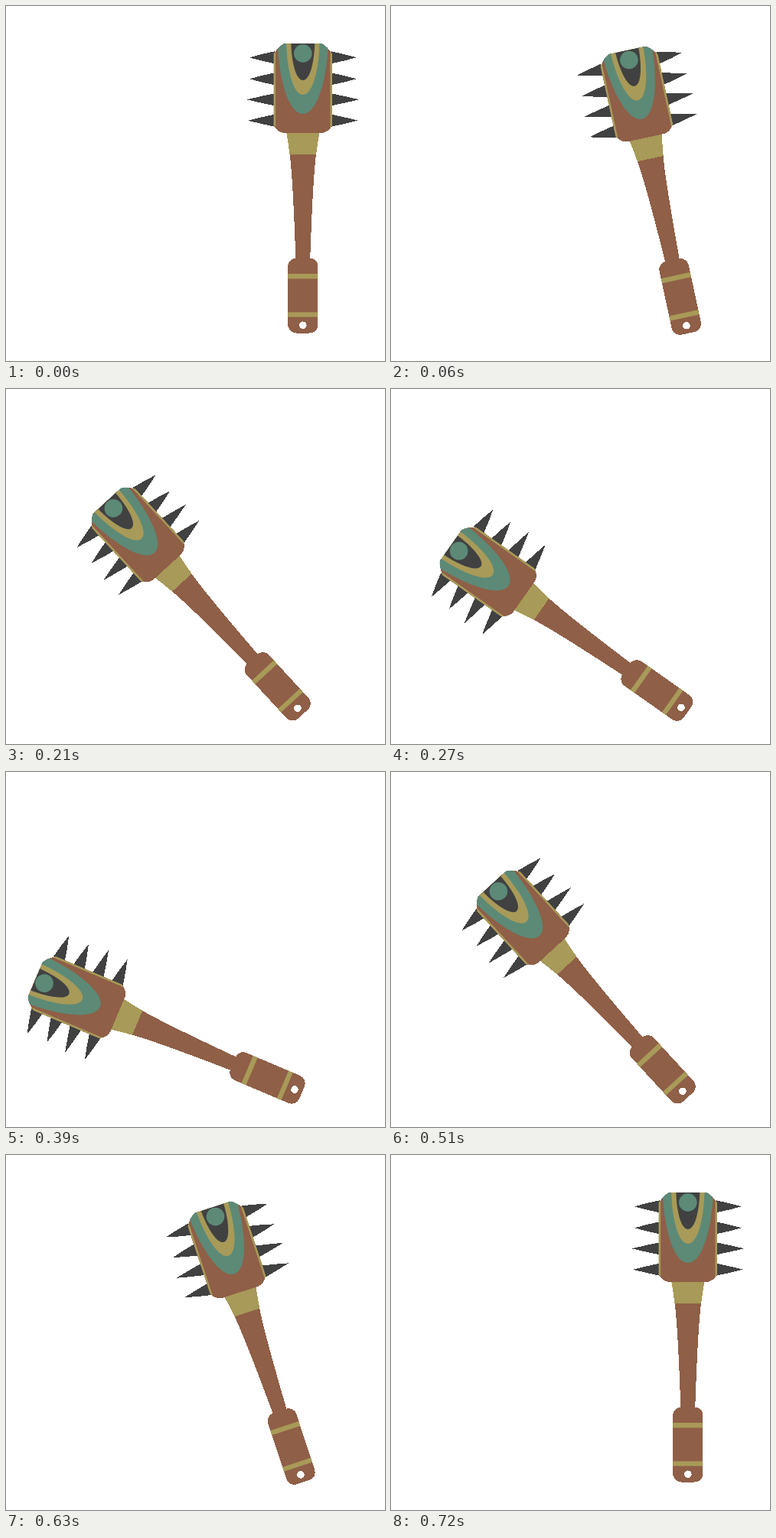
An HTML page for the animation above (0.75 s loop, 495 by 464 pixels).

```html
<!DOCTYPE html>
<html lang="en">
<head>
<meta charset="utf-8">
<title>Swinging club</title>
<style>
  html, body { margin: 0; width: 100%; height: 100%; overflow: hidden; background: #fff; }
  svg { display: block; }
  .crisp { shape-rendering: crispEdges; }
  .wood { fill: #8f5f47; }
  .gold { fill: #a89a58; }
  .teal { fill: #5c8a77; }
  .dark { fill: #414142; }
</style>
</head>
<body>
<svg width="495" height="464" viewBox="0 0 495 464">
  <defs>
    <clipPath id="headClip"><use href="#head"/></clipPath>
  </defs>
  <!-- x is measured from the club's axis -->
  <g id="club">
    <path id="spikes" class="dark crisp"/>
    <path class="wood crisp" d="M-17.3 193 Q-13 226 -9.4 331 H9.4 Q13 226 17.3 193Z"/>
    <path class="gold crisp" d="M-21.7 165 Q-19 180 -17.3 194 H17.3 Q19 180 21.7 165Z"/>
    <path id="head" class="wood crisp" d="M-24.5 49 H24.5 Q31.5 52.5 38.2 62.5 V156 Q33 165 25 166 H-25 Q-33 165 -38.2 156 V62.5 Q-31.5 52.5 -24.5 49Z"/>
    <g clip-path="url(#headClip)">
      <path class="gold" d="M-39 49 h3.3 v117 h-3.3Z M39 49 h-3.3 v117 h3.3Z"/>
      <path class="teal" d="M-33 48 C-32 90 -20 141 0 141 S32 90 33 48Z"/>
      <path class="gold" d="M-21.7 48 C-21 82 -13 116 0 116 S21 82 21.7 48Z"/>
      <path class="dark" d="M-15.5 48 C-15 72 -9.5 97 0 97 S15 72 15.5 48Z"/>
      <circle class="teal" cy="62" r="11.8"/>
    </g>
    <rect class="wood crisp" x="-19.5" y="329.5" width="39" height="98" rx="11"/>
    <path class="gold" d="M-19.5 350 h39 v6.5 h-39Z M-19.5 400.3 h39 v6.2 h-39Z"/>
    <circle class="crisp" cy="417.2" r="4.8" fill="#fff"/>
  </g>
</svg>
<script>
  const STEP_MS = 30, STEPS = 25, TURN = 12;
  const DEGREES_PER_STEP = 6.09;
  const club = document.getElementById('club');

  const spike = (side, reach, y) =>
    `M${side * 37} ${y - 8} Q${side * 54} ${y - 4.6} ${side * reach} ${y}` +
    `Q${side * 54} ${y + 4.6} ${side * 37} ${y + 8}Z`;

  const rows = [[70, 67.3], [69.7, 95.3], [73.5, 122.3], [71.8, 149.7]];
  document.getElementById('spikes').setAttribute('d',
    rows.map(([reach, y]) => spike(-1, reach, y) + spike(1, reach, y)).join(''));

  // The grip drifts slightly while the club swings down and back up.
  function draw(now) {
    const step = Math.floor(now / STEP_MS) % STEPS;
    const angle = DEGREES_PER_STEP * (TURN - Math.abs(step - TURN));
    const x = 387.8 - 0.164 * angle;
    const y = 417 + 0.06 * angle - 0.00135 * angle * angle;
    club.setAttribute('transform', `translate(${x} ${y}) rotate(${-angle}) translate(0 -417)`);
  }

  function tick() {
    draw(performance.now());
    requestAnimationFrame(tick);
  }
  tick();
</script>
</body>
</html>
```
